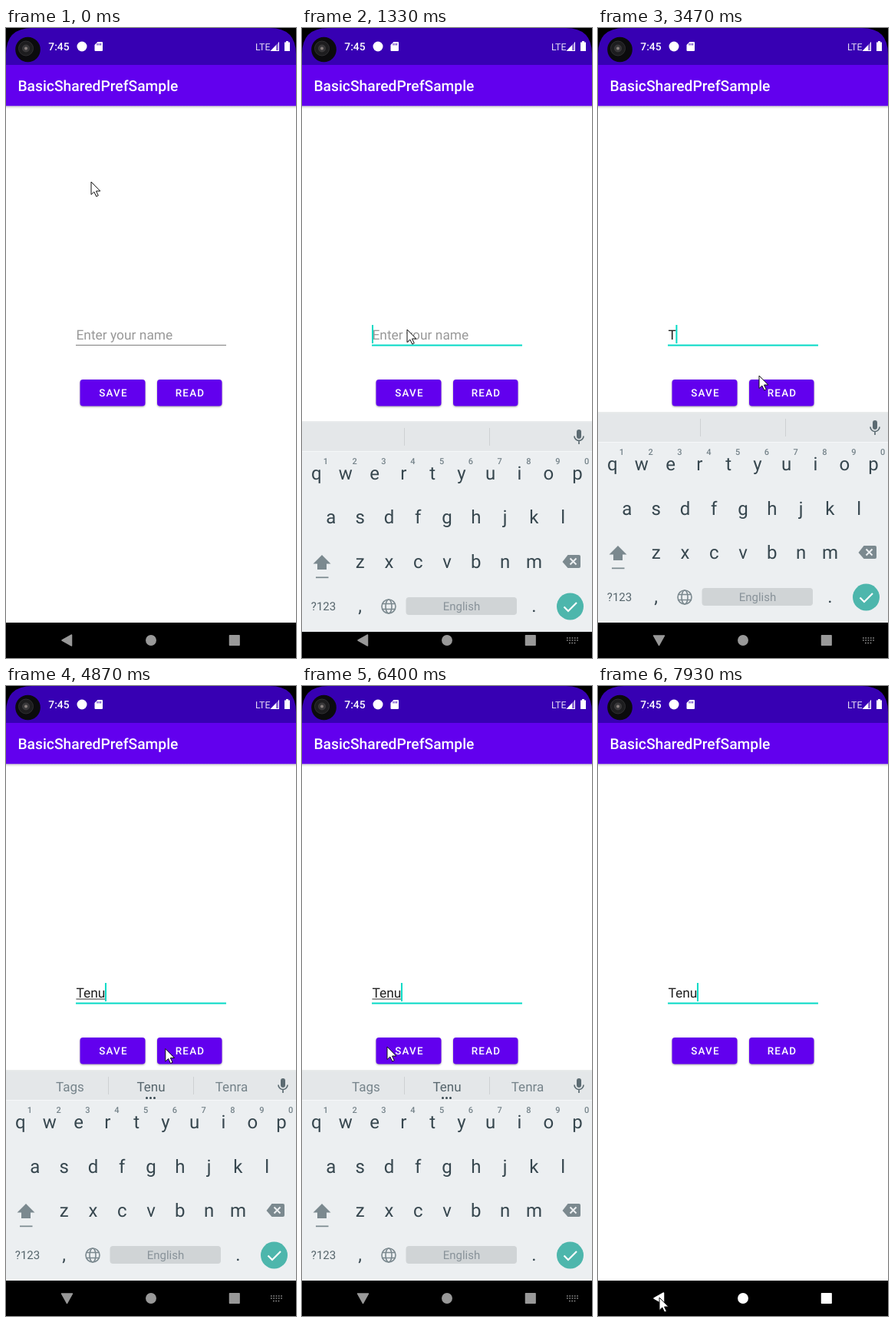
Animation, 378 px wide and 819 px high, one loop 8 s. Source, as an HTML page:

```html
<!DOCTYPE html>
<html lang="en">
<head>
<meta charset="utf-8">
<title>Shared preferences demo</title>
<style>
  html, body { margin: 0; width: 100%; height: 100%; overflow: hidden; background: #fff; }
  svg { display: block; width: 100%; height: 100%; font-family: Roboto, sans-serif; text-rendering: geometricPrecision; }
  .mid { text-anchor: middle; }
  .title { font-size: 19.25px; font-weight: 500; fill: #fff; }
  .field { font-size: 17.4px; fill: #212121; }
  .btn { filter: drop-shadow(0 1px 1px rgba(0,0,0,.35)); }
  .label { font-size: 13.4px; font-weight: 500; letter-spacing: 1.2px; fill: #fff; }
  .key { font-size: 24px; fill: #37474f; }
  .num { font-size: 11px; font-weight: 500; fill: #75838a; }
  .small { font-size: 15px; }
  .word { font-size: 17px; fill: #75838a; }
</style>
</head>
<body>
<svg viewBox="0 0 378 819" preserveAspectRatio="none">
  <defs>
    <linearGradient id="fall" x2="0" y2="1">
      <stop stop-color="#000" stop-opacity=".2"/><stop offset="1" stop-color="#000" stop-opacity="0"/>
    </linearGradient>
    <clipPath id="saveClip"><rect x="96.5" y="457" width="85" height="34.6" rx="3.8"/></clipPath>
  </defs>

  <rect width="378" height="819" fill="#fff"/>
  <rect y="101" width="378" height="4" fill="url(#fall)"/>
  <rect width="378" height="48" fill="#3700b3"/>
  <rect y="48" width="378" height="53.3" fill="#6200ee"/>
  <path d="M0 0H34Q0 0 0 34ZM378 0H344Q378 0 378 34Z"/>
  <text class="title" x="15.4" y="82">BasicSharedPrefSample</text>

  <!-- status bar -->
  <circle cx="28.5" cy="28" r="16.3" fill="#0b0b0d"/>
  <circle cx="26" cy="26.5" r="9.5" fill="#1d1d1f" stroke="#303032"/>
  <circle cx="26" cy="26.5" r="5" fill="#39383a"/>
  <circle cx="26" cy="26.5" r="2" fill="#88807e"/>
  <text x="55.3" y="29" font-size="13.8" font-weight="500" fill="#fff">7:45</text>
  <circle cx="99" cy="24" r="6.5" fill="#fff"/>
  <path d="M119.5 18H125q1 0 1 1V29q0 1-1 1H116.500q-1 0-1-1V22Z" fill="#fff"/>
  <path d="M119 20v2.500M121.300 20v2.500M123.500 20v2.500" stroke="#3700b3"/>
  <text x="325" y="28.500" font-size="12.4" fill="#e4dcf4">LTE</text>
  <path d="M344.500 30L356 18V30Z" fill="#8b6bd4"/>
  <path d="M344.500 30L352 22.200V30ZM355 19L356 18V30H344.500L345.500 29H355Z" fill="#fff"/>
  <path d="M363 18.500h2v-1.500h3v1.500h2V30h-7Z" fill="#fff"/>

  <!-- form -->
  <text id="hint" class="field" x="91.4" y="405" style="fill:#999">Enter your name</text>
  <text id="typed" class="field" x="91.4" y="405"></text>
  <rect id="under" x="91.400" y="406.500" height="1" fill="#333"/>
  <rect id="line" x="91" width="196"/>
  <rect id="caret" y="386" width="2" height="24" fill="#03dac5"/>
  <g id="save" class="btn">
    <rect x="96.5" y="457" width="85" height="34.6" rx="3.8" fill="#6200ee"/>
    <circle id="ink" clip-path="url(#saveClip)" cx="112" cy="470" fill="#fff"/>
    <text class="label mid" x="140" y="479.400">SAVE</text>
  </g>
  <g class="btn">
    <rect x="197" y="457" width="84.500" height="34.6" rx="3.8" fill="#6200ee"/>
    <text class="label mid" x="240" y="479.400">READ</text>
  </g>

  <!-- navigation bar -->
  <rect y="773" width="378" height="46"/>
  <rect id="press" x="35" y="773" width="89" height="46" rx="22" fill="#fff"/>
  <g id="nav" stroke-linejoin="round" stroke-width="1.500">
    <path id="back" d="M73 796L85.500 789V803Z"/>
    <circle cx="189" cy="796" r="6.200"/>
    <rect x="291.500" y="789.700" width="12.600" height="12.600"/>
  </g>
  <path id="switch" d="M345 793h15M345 796h15M348 799.500h9" stroke="#8a8a8a" stroke-width="1.700" stroke-dasharray="1.700 1.600"/>

  <!-- keyboard -->
  <g id="board">
    <rect y="500" width="378" height="273" fill="#eceff1"/>
    <rect y="500" width="378" height="38.500" fill="#e4e7e9"/>
    <rect y="538" width="378" height="1" fill="#f6f8f9"/>
    <rect y="499" width="378" height="1.500" fill="#e9ebec"/>
    <path d="M133.500 508v23M244.500 508v23" stroke="#cdd1d3"/>
    <g id="words">
      <text class="word mid" x="83.500" y="527"></text>
      <text class="word mid" x="189" y="527" style="fill:#56656c"></text>
      <text class="word mid" x="294" y="527"></text>
      <g fill="#37474f"><circle cx="183.500" cy="535.500" r="1.500"/><circle cx="188.500" cy="535.500" r="1.500"/><circle cx="193.500" cy="535.500" r="1.500"/></g>
    </g>
    <rect x="358" y="510" width="6" height="12" rx="3" fill="#5c6b72"/>
    <path d="M355 518.500a6 6 0 0 0 12 0M361 524.500V529" fill="none" stroke="#5c6b72" stroke-width="1.700"/>
    <g id="keys"></g>
    <g fill="#7b898f">
      <path d="M26 673L37.500 684.500H32V692H20V684.500H14.500Z"/>
      <rect x="18" y="701.500" width="16.500" height="1.700"/>
      <path d="M339.500 682L346.500 673H361q2 0 2 2V688q0 2-2 2H346.500Z"/>
    </g>
    <path d="M349.500 677.500l8 8M357.500 677.500l-8 8" stroke="#eceff1" stroke-width="2"/>
    <text class="small mid" x="28" y="745" fill="#56656c">?123</text>
    <g fill="none" stroke="#7b898f" stroke-width="1.600">
      <circle cx="113" cy="740" r="9"/><ellipse cx="113" cy="740" rx="4" ry="9"/>
      <path d="M105 736.500H121M105 743.500H121"/>
    </g>
    <rect x="135.500" y="728" width="144.500" height="23" rx="4" fill="#d0d4d6"/>
    <text class="small mid" x="208" y="745" fill="#89939a">English</text>
    <circle cx="349.500" cy="740" r="17.500" fill="#4db6ac"/>
    <path d="M341.500 740.500l5.500 5.500L358 735" fill="none" stroke="#fff" stroke-width="2.200"/>
  </g>

  <path id="mouse" d="M0 0V16.500L3.800 13L6.700 19L9.300 17.800L6.500 12H11.800Z" fill="#fff" stroke="#111" stroke-width="1"/>
</svg>
<script>
const $ = id => document.getElementById(id);
const LOOP = 8000, STEP = 1000 / 15, COL = 37.8;
const clamp = v => Math.min(1, Math.max(0, v));
const span = (t, a, b) => clamp((t - a) / (b - a));
const smooth = p => p * p * (3 - 2 * p);
const between = (t, a, b) => t >= a && t < b;
const set = (id, attrs) => { for (const k in attrs) $(id).setAttribute(k, attrs[k]); };

function label(text, x, y, cls) {
  const el = document.createElementNS('http://www.w3.org/2000/svg', 'text');
  el.setAttribute('x', x);
  el.setAttribute('y', y);
  el.setAttribute('class', cls + ' mid');
  el.textContent = text;
  $('keys').append(el);
}
[['qwertyuiop', 0.5, 575], ['asdfghjkl', 1, 632.5], ['zxcvbnm', 2, 690]].forEach(([row, start, y]) =>
  [...row].forEach((c, i) => label(c, COL * (start + i), y, 'key')));
[...'1234567890'].forEach((c, i) => label(c, COL * (i + 0.5) + 12, 555, 'num'));
label(',', 75.6, 747, 'key');
label('.', 302.4, 747, 'key');

// pointer moves: start, end, then three points of a quadratic curve
const MOVES = [
  [67, 733, 111, 200, 420, 290, 137, 392],
  [1640, 1660, 137, 392, 138, 391, 139, 391],
  [2000, 2733, 139, 391, 200, 528, 210, 452],
  [4820, 5333, 210, 452, 205, 549, 111, 469],
  [6670, 7400, 111, 469, 70, 640, 80, 795]
];
const BLINKS = [1060, 1660, 2125, 2625, 3125, 4925, 5460, 5925, 6390, 6890, 7390];
const NAME = 'Tenu', TYPED = [3460, 3790, 4190, 4390];
const HINTS = [
  [3590, 'The', 'T', 'To'],
  [3990, 'Ten', 'Te', 'Text'],
  [4260, 'Then', 'Ten', 'Tent'],
  [4460, 'Tags', NAME, 'Tenra']
];
const last = (list, t, at = v => v) => list.filter(v => t >= at(v)).length;

function pointer(t) {
  const m = MOVES[Math.max(0, last(MOVES, t, v => v[0]) - 1)];
  const p = span(t, m[0], m[1]), u = p * (1.25 - 0.25 * p), v = 1 - u;
  const on = i => v * v * m[i] + 2 * u * v * m[i + 2] + u * u * m[i + 4];
  return [on(2), on(3)];
}

function form(t) {
  const count = last(TYPED, t), focus = t >= 1060;
  $('hint').style.opacity = count ? 0 : 1;
  $('typed').textContent = NAME.slice(0, count);
  const width = count ? $('typed').getComputedTextLength() : 0;
  const words = last(HINTS, t, v => v[0]);
  set('under', { width: words === count && t < 7525 ? width : 0 });
  set('line', { y: focus ? 411.5 : 411.8, height: focus ? 2 : 1, fill: focus ? '#03dac5' : '#777' });
  set('caret', { x: 91 + width, opacity: last(BLINKS, t) % 2 });
  $('words').style.opacity = words ? 1 : 0;
  if (words) HINTS[words - 1].slice(1).forEach((w, i) => $('words').children[i].textContent = w);

  const p = span(t, 5400, 5930), lift = Math.sin(Math.PI * p);
  set('ink', { r: 10 + 70 * Math.sqrt(p), opacity: 0.26 * lift });
  $('save').style.filter = `drop-shadow(0 ${1 + 2 * lift}px ${1 + 1.5 * lift}px rgba(0,0,0,.35))`;
}

function system(t) {
  const enter = span(t, 1133, 1533), leave = span(t, 7467, 7800);
  const y = 48 * (1 - enter) ** 2 + 63 * leave ** 1.5;
  set('board', {
    transform: `translate(0 ${y.toFixed(2)})`,
    opacity: span(t, 1133, 1333) * (1 - leave ** 1.3)
  });
  const turn = smooth(span(t, 1333, 1533)) - smooth(span(t, 7533, 7800));
  set('back', { transform: `rotate(${-90 * turn} 79.5 796)` });
  const grey = Math.round(153 + 102 * span(t, 7667, 7867));
  const tone = `rgb(${grey},${grey},${grey})`;
  set('nav', { fill: tone, stroke: tone });
  set('switch', { opacity: between(t, 1325, 7525) ? 1 : 0 });
  const grow = span(t, 7333, 7590);
  set('press', {
    x: 79.5 - 44.5 * grow, width: 89 * grow,
    opacity: 0.2 * grow * (1 - span(t, 7600, 7867))
  });
}

function draw(now) {
  const t = Math.floor((now % LOOP + 4) / STEP) * STEP % LOOP;
  form(t);
  system(t);
  const [x, y] = pointer(t);
  set('mouse', { transform: `translate(${x.toFixed(1)} ${y.toFixed(1)})` });
}

const begin = performance.now();
function tick() {
  draw(performance.now() - begin);
  requestAnimationFrame(tick);
}
tick();
</script>
</body>
</html>
```
